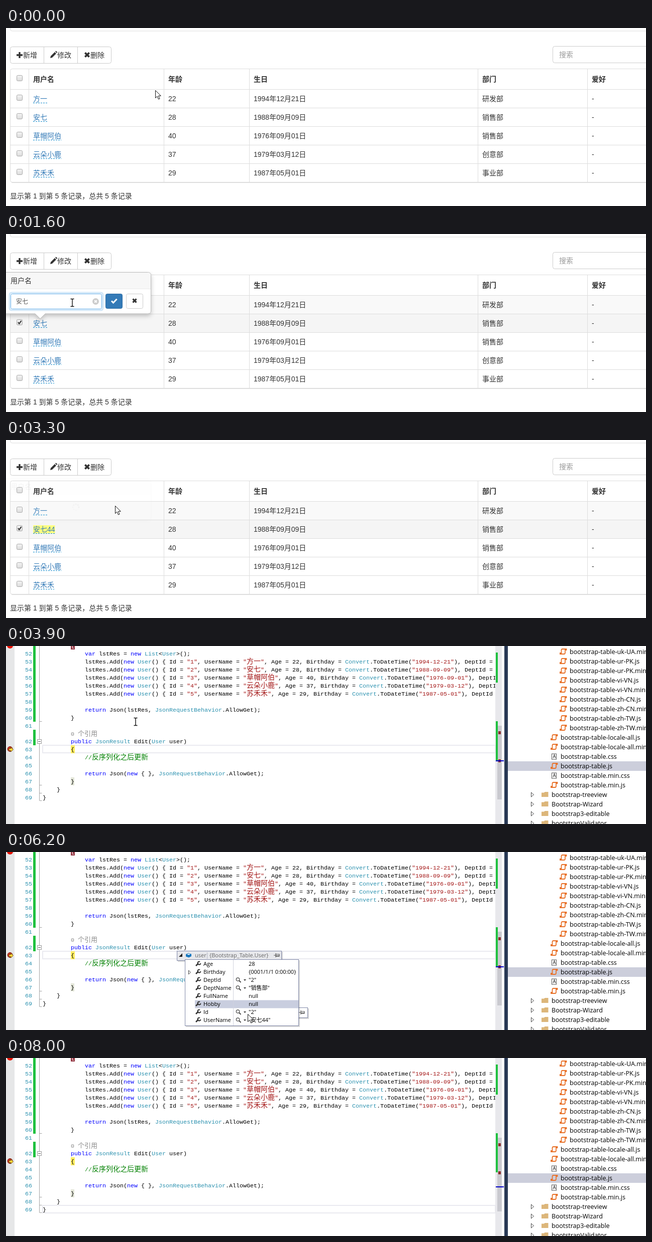
An HTML page for the animation above (8.1 s loop, 1274 by 355 pixels).

```html
<!DOCTYPE html>
<html lang="zh-CN">
<head>
<meta charset="utf-8">
<title>Inline table editing</title>
<style>
html, body { margin: 0; width: 100%; height: 100%; overflow: hidden; background: #fff; }
svg { display: block; width: 100vw; height: 100vh; }
text { white-space: pre; }
.page { font: 14px "Liberation Sans", "Noto Sans CJK SC", "Noto Sans CJK JP", sans-serif; }
.code { font: 11.667px "Liberation Mono", "Noto Sans CJK SC", "Noto Sans CJK JP", monospace; }
.tip { font: 11px "Open Sans", "Noto Sans", "Noto Sans CJK SC", "Noto Sans CJK JP", sans-serif; }
.tree { font: 12.55px "Open Sans", "Noto Sans", sans-serif; }
</style>
</head>
<body>
<svg id="stage" viewBox="0 0 1274 355" preserveAspectRatio="none">
  <defs>
    <linearGradient id="box" x2="0" y2="1"><stop stop-color="#f4f4f4"/><stop offset="1" stop-color="#dcdcdc"/></linearGradient>
    <filter id="shadow" x="-20%" y="-20%" width="140%" height="160%"><feDropShadow dx="0" dy="4" stdDeviation="4" flood-opacity=".22"/></filter>
    <clipPath id="editor"><rect width="974" height="355"/></clipPath>
  </defs>
  <g id="table" class="page"></g>
  <g id="ide"></g>
  <g id="live"></g>
</svg>
<script>
const LOOP = 8100, IDE_START = 3400;
const people = [
  ['方一', 22, '1994-12-21', '研发部'],
  ['安七', 28, '1988-09-09', '销售部'],
  ['草帽阿伯', 40, '1976-09-01', '销售部'],
  ['云朵小鹿', 37, '1979-03-12', '创意部'],
  ['苏禾禾', 29, '1987-05-01', '事业部']
];
const edited = people[1][0];
const $ = id => document.getElementById(id);
const esc = s => String(s).replace(/&/g, '&amp;').replace(/</g, '&lt;');
const text = (x, y, s, fill = '#333', more = '') => `<text x="${x}" y="${y}" fill="${fill}" ${more}>${esc(s)}</text>`;
const rect = (x, y, w, h, fill, more = '') => `<rect x="${x}" y="${y}" width="${w}" height="${h}" fill="${fill}" ${more}/>`;
const path = (d, fill, more = '') => `<path d="${d}" fill="${fill}" ${more}/>`;
const line = (d, color, w = 1, more = '') => path(d, 'none', `stroke="${color}" stroke-width="${w}" ${more}`);
const move = (x, y, s) => `<g transform="translate(${x} ${y})">${s}</g>`;
const framed = (x, y, w, h, fill, stroke, r = 0) => rect(x + .5, y + .5, w, h, fill, `stroke="${stroke}" rx="${r}"`);
const times = (x, y, r, color, w) => line(`M${x - r} ${y - r}l${2 * r} ${2 * r}m0 ${-2 * r}l${-2 * r} ${2 * r}`, color, w);

// ---- table page ----
const rowY = i => 123 + 37 * i;

function checkbox(y, on) {
  return framed(21, y, 11, 11, 'url(#box)', '#a8a8a8', 2) +
    (on ? line(`M24 ${y + 6}l2.3 2.8l4.3 -6`, '#333', 2) : '');
}

function nameCell(i, name, marked) {
  const y = rowY(i), w = [...name].reduce((s, c) => s + (c < '\u0100' ? 7.8 : 14), 0);
  return (marked ? rect(54, y + 10, w, 16, '#ffff80') : '') +
    text(54, y + 23, name, '#337ab7') +
    line(`M54 ${y + 26.5}h${w}`, '#0088cc', 1, 'stroke-dasharray="3 2"');
}

function tablePage() {
  let s = rect(0, 0, 1274, 355, '#fff') +
    line('M8.5 0v2q0 4 4 4h1270', '#ddd') +
    framed(8, 37, 201, 33, '#fff', '#ccc', 4) + line('M75.5 37v34M142.5 37v34', '#ccc') +
    line('M21 54h12M27 48v12', '#333', 3.4) + text(34, 59, '新增') +
    path('M88 60l1-4l8-8l3 3l-8 8zM98 47l1.5-1.5l3 3l-1.5 1.5z', '#333') + text(102, 59, '修改') +
    times(161.5, 53.5, 4.2, '#333', 3.8) + text(168, 59, '删除') +
    framed(1088, 36, 220, 33, '#fff', '#ccc', 4) + text(1101, 58, '搜索', '#999');
  s += '<g id="rows"></g>' + framed(8, 81, 1300, 226, 'none', '#ddd', 4) + line('M11 308.5H1274', '#ddd');
  for (let i = 0; i < 5; i++) s += line(`M8 ${rowY(i) - .5}H1274`, '#ddd');
  s += line([45, 314, 484, 939, 1157].map(x => `M${x}.5 82V307`).join(''), '#ddd') + checkbox(94);
  [[54, '用户名'], [323, '年龄'], [493, '生日'], [948, '部门'], [1166, '爱好']]
    .forEach(([x, t]) => s += text(x, 107, t, '#333', 'font-weight="bold"'));
  people.forEach(([, age, date, dept], i) => {
    const y = rowY(i) + 23, [a, b, c] = date.split('-');
    s += text(323, y, age) + text(493, y, `${a}年${b}月${c}日`) + text(948, y, dept) + text(1166, y, '-');
  });
  return s + '<g id="names"></g>' + text(8, 340, '显示第 1 到第 5 条记录，总共 5 条记录');
}

function popover(t) {
  const alpha = t < 1000 ? .5 : t < 3200 ? 1 : t < 3300 ? .4 : .05;
  const saving = t >= 2900;
  const value = edited + '4'.repeat(t < 2000 ? 0 : t < 2200 ? 1 : 2);
  let s = '<g filter="url(#shadow)">' +
    path('M-10 76.5H282.5q6 0 6 6V153q0 6 -6 6H78l-10 10l-10 -10H-10z', '#fff', 'stroke="#bbb"') + '</g>' +
    path('M-10 77H282q6 0 6 6V109H-10z', '#f7f7f7') + line('M0 109.5H288', '#ebebeb') +
    text(9, 98, '用户名');
  if (saving) {
    for (let i = 0; i < 8; i++) {
      const a = (i + t / 100) * Math.PI / 4;
      s += `<circle cx="${139 + 6 * Math.cos(a)}" cy="${134 + 6 * Math.sin(a)}" r="1.6" fill="#555" opacity="${(i + 1) / 8}"/>`;
    }
  } else {
    s += rect(7, 117, 186, 35, 'none', 'stroke="#66afe9" stroke-opacity=".3" stroke-width="3" rx="4"') +
      framed(9, 119, 181, 30, '#fff', '#66afe9', 3) + text(20, 139, value, '#555', 'font-size="12"') +
      '<circle cx="178.5" cy="134.5" r="6.5" fill="#ccc"/>' + times(178.5, 134.5, 2.3, '#fff', 2) +
      framed(198, 119, 33, 29, '#337ab7', '#2e6da4', 3) + line('M210 133.5l3.6 3.6l7 -7.4', '#fff', 3) +
      framed(239, 119, 33, 29, '#fff', '#ccc', 3) + times(256, 133, 3.5, '#333', 3.2);
    if (t >= 1800) s += rect(45 + 6.7 * (value.length - 2), 127, 1, 14, '#333');
  }
  return `<g class="page" opacity="${alpha}">${s}</g>`;
}

// ---- code editor ----
const keywords = /^(var|new|return|public)$/, types = /^(List|User|Convert|JsonRequestBehavior|JsonResult)$/;

function codeLine(col, y, src) {
  let x = 73 + 7 * col, s = '';
  for (const [tok] of src.matchAll(/\/\/.*|"[^"]*"|\w+|\s+|[^\w\s"]/g)) {
    const fill = tok.startsWith('//') ? '#008000' : tok[0] === '"' ? '#a31515' :
      keywords.test(tok) ? '#0000ff' : types.test(tok) ? '#2b91af' : '#000';
    for (const [run] of tok.matchAll(/[\u4e00-\u9fff]+|[^\u4e00-\u9fff]+/g)) {
      const wide = run >= '\u4e00';
      if (run.trim()) s += text(x, y, run, fill, wide ? 'font-size="14"' : '');
      x += run.length * (wide ? 14 : 7);
    }
  }
  return s;
}

function treeIcon(x, y, kind) {
  if (kind === 'css') return framed(x - 5, y - 6, 9, 11, '#fff', '#555') +
    line(`M${x - 2} ${y + 3}l2.5 -7l2.5 7m-4 -2.5h3`, '#555', 1.2);
  if (kind === 'dir') return path(`M${x - 7} ${y - 4}h5l1.5 -1.5h7v10h-13.5z`, '#dcb67a');
  return line(`M${x - 6} ${y + 2.5}v2h8q2 0 2 -3v-5h2.5v-2h-8q-2 0 -2 3v5z`, '#e8722a', 1.8);
}

function tree() {
  const deep = ['uk-UA.min.js', 'ur-PK.js', 'ur-PK.min.js', 'vi-VN.js', 'vi-VN.min.js',
    'zh-CN.js', 'zh-CN.min.js', 'zh-TW.js', 'zh-TW.min.js'].map(n => [1122, 'bootstrap-table-' + n]);
  const files = ['-locale-all.js', '-locale-all.min.js', '.css', '.js', '.min.css', '.min.js']
    .map(n => [1104, 'bootstrap-table' + n]);
  const dirs = ['bootstrap-treeview', 'Bootstrap-Wizard', 'bootstrap3-editable', 'bootstrapValidator']
    .map(n => [1086, n, 'dir']);
  let s = rect(999, 0, 275, 355, '#fff') + rect(999, 230, 275, 19, '#cccedb');
  [...deep, ...files, ...dirs].forEach(([x, name, dir], i) => {
    const y = 11.5 + 19 * i;
    s += treeIcon(x - 13, y, dir || (name.endsWith('.css') ? 'css' : 'js')) + text(x, y + 4.5, name, '#000');
    if (dir) s += path(`M1045.5 ${y - 4.5}l5 4.5l-5 4.5z`, '#fff', 'stroke="#444"');
  });
  return `<g class="tree">${s}</g>`;
}

function idePage() {
  let s = rect(0, 0, 1274, 355, '#fff') + rect(0, 0, 17, 355, '#e6e7e8') +
    '<circle cx="8" cy="-1" r="6" fill="#e51400"/>' +
    '<circle cx="8" cy="205.5" r="5" fill="#c8321e" stroke="#7a2418"/>' +
    path('M6 204.5h3.5v-2.5l5 4.5l-5 4.5v-2.5h-3.5z', '#ffd83b', 'stroke="#5a4310" stroke-width=".8"') +
    rect(54, 0, 5, 151, '#1fc13f') + rect(54, 167, 5, 31, '#1fc13f') +
    line('M66.5 0V308M66.5 150.5h5M66.5 277.5h5M66.5 293.5h5M66.5 308.5h5', '#a5a5a5') +
    framed(62, 186, 8, 8, '#fff', '#999') + line('M64 190.5h5', '#555') +
    '<g id="current"></g>' +
    rect(129, 0, 8, 7, '#963a46') + rect(129, 198, 8, 16, '#ffee62') + rect(129, 262, 7, 16, '#e3e6d8');
  const adds = people.map(([n, age, date], i) =>
    `lstRes.Add(new User() { Id = "${i + 1}", UserName = "${n}", Age = ${age}, Birthday = Convert.ToDateTime("${date}"), DeptId = "1" });`);
  const source = [[12, 'var lstRes = new List<User>();'], ...adds.map(a => [12, a]), [0, ''],
    [12, 'return Json(lstRes, JsonRequestBehavior.AllowGet);'], [8, '}'], [0, ''],
    [8, 'public JsonResult Edit(User user)'], [8, '{'], [12, '//反序列化之后更新'], [0, ''],
    [12, 'return Json(new { }, JsonRequestBehavior.AllowGet);'], [8, '}'], [4, '}'], [0, '}']];
  let c = text(129, 3, '{', '#fff');
  source.forEach(([col, src], i) => {
    const y = 19 + 16 * i + (i > 9 ? 15 : 0);
    c += text(52, y, 52 + i, '#2b91af', 'text-anchor="end"') + codeLine(col, y, src);
  });
  c += text(129, 179, '0', '#8a8a8a') + text(143, 179, '个引用', '#8a8a8a', 'font-size="13"');
  s += `<g class="code" clip-path="url(#editor)">${c}</g>`;
  s += rect(974, 0, 13, 355, '#e8e8ec') + rect(978, 159, 9, 147, '#c9c9cf') +
    rect(975, 13, 4, 60, '#1fc13f') + rect(975, 150, 4, 78, '#1fc13f') +
    rect(980, 170, 5, 6, '#8b2e2e') + rect(980, 226, 5, 6, '#8b2e2e') +
    '<g id="mark"></g>' + rect(992, 0, 7, 355, '#293955');
  return s + tree();
}

const pin = (x, y) => line(`M${x - 6} ${y}h4m0 -4v8m0 -6h7v4h-7m0 -1h7`, '#555', 1.2);
const panel = (x, y, w, h, fill = '#fff') =>
  rect(x + 2, y + 2, w + 1, h + 1, '#000', 'opacity=".15"') + framed(x, y, w, h, fill, '#8088a8');
const fields = [['Age', '28'], ['Birthday', '{0001/1/1 0:00:00}'], ['DeptId', '"2"', 1], ['DeptName', '"销售部"', 1],
  ['FullName', 'null'], ['Hobby', 'null'], ['Id', '"2"', 1], ['UserName', `"${edited}44"`, 1]];

function dataTip(t) {
  const open = t >= 5400, busy = t >= 5000 && !open;
  let s = panel(340, 197, 208, 19, '#e7e8ec') +
    (open ? path('M351 202v7h-7z', '#1e1e1e') : path('M346 202l4.5 4.5l-4.5 4.5z', '#1e1e1e')) +
    (busy ? '<circle cx="361.5" cy="205" r="5.5" fill="#bfe6fb" stroke="#1976c8" stroke-width="3.4"/>'
          : path('M358 204l5 -2.5l6 2v4.5l-5 2.5l-6 -2z', '#1878c0') + path('M360 204l3.5 -1.5l3.5 1.2l-3 1.5z', '#fff')) +
    text(376, 210, 'user', '#666') + line('M400.5 200v13', '#b5b7c4') +
    text(405, 210, '{Bootstrap_Table.User}', '#666') + pin(539, 206);
  if (open) {
    const hot = t < 5800 ? -1 : Math.min(7, Math.floor((cursorAt(Math.min(t, 7000) - 100)[1] - 215) / 16));
    const pinY = Math.min(224 + 16 * (hot + 1), 320);
    if (hot >= 0) s += panel(580, hot < 7 ? pinY - 10 : 327, 20, hot < 7 ? 20 : 19) + pin(589, pinY);
    s += panel(356, 214, 226, 132);
    if (hot >= 0) s += rect(376, 215.5 + 16 * hot, 206, 16, '#c9cedf');
    s += line('M452.5 215v131', '#d0d3de');
    fields.forEach(([name, value, lens], i) => {
      const y = 223 + 16 * i;
      s += line(`M378 ${y + 4}l5 -5`, '#333', 2.6) + line(`M386 ${y - 4}a3 3 0 1 0 1.5 3`, '#333', 2) +
        text(393, y + 4, name, '#000') + text(483, y + 4, value, '#000');
      if (lens) s += `<circle cx="461.5" cy="${y - 1}" r="3.2" fill="none" stroke="#444" stroke-width="1.2"/>` +
        line(`M464 ${y + 1.5}l3.5 3.5`, '#444', 1.8) + path(`M473 ${y - 1}h5l-2.5 3z`, '#333');
    });
    s += path('M363.5 236l4 4l-4 4z', '#fff', 'stroke="#444"');
  }
  return `<g class="tip">${s}</g>`;
}

// ---- pointer ----
const track = [[0, 297, 124], [400, 139, 187], [700, 68, 176], [900, 68, 176], [1200, 262, 196], [1600, 132, 137],
  [2400, 132, 137], [2800, 217, 131], [3700, 217, 131], [4300, 341, 190],
  [4600, 341, 190], [4800, 347, 203], [5700, 347, 203], [6100, 455, 302], [6200, 481, 323], [6600, 520, 337],
  [6700, 516, 337], [6800, 516, 337], [6900, 513, 337], [7000, 513, 337], [7100, 640, 310], [7300, 640, 310],
  [7700, 1243, 210], [8100, 1243, 210]];
const looks = [[0, 'arrow'], [600, 'hand'], [1400, 'beam'], [1800, ''], [2500, 'beam'], [2700, 'arrow'],
  [3400, 'beam'], [4700, 'arrow'], [7800, '']];
const pointers = {
  arrow: path('M.5 .5V15.5L4 12.2L6.5 18L9 17L6.5 11.3H11.3z', '#fff', 'stroke="#111"'),
  beam: line('M-3.5 -7.5h2.5l1 1l1 -1h2.5M0 -6.5V6.5M-3.5 7.5h2.5l1 -1l1 1h2.5', '#111', 1.4),
  hand: path('M-1 1q1.5 -2 3 0v6l8 2q2 1 1.5 4l-1.5 4h-8l-5 -6q0 -2 2 -1.5z', '#fff', 'stroke="#111"')
};

function cursorAt(t) {
  const i = track.findIndex(k => k[0] > t), a = track[i - 1], b = track[i];
  const p = (t - a[0]) / (b[0] - a[0]);
  return [a[1] + (b[1] - a[1]) * p, a[2] + (b[2] - a[2]) * p].map(Math.round);
}

function pointer(t) {
  const look = looks.filter(k => k[0] <= t).pop()[1];
  return look ? move(...cursorAt(t), pointers[look]) : '';
}

// ---- timeline ----
function draw(t) {
  const ide = t >= IDE_START;
  $('table').style.display = ide ? 'none' : '';
  $('ide').style.display = ide ? '' : 'none';
  let s = '';
  if (ide) {
    const last = t >= 7300, y = last ? 294 : 198;
    $('current').innerHTML = t < 3500 ? '' : rect(73, y, 901, 15, '#fff', 'stroke="#eaeaf0" stroke-width="2"');
    $('mark').innerHTML = rect(975, last ? 256 : 228, 16, 2, '#0000c8');
    if (t >= 4400 && !last) s += dataTip(t);
    if (last && t < 8000) s += rect(80, 294, 1, 15, '#000');
  } else {
    const picked = t >= 700, saved = t >= 3200;
    $('rows').innerHTML = picked ? rect(9, 123, 1265, 36, '#f9f9f9') + rect(9, 160, 1265, 36, '#f5f5f5') : '';
    $('names').innerHTML = people.map(([n], i) => checkbox(rowY(i) + 10, i === 1 && picked) +
      nameCell(i, i === 1 && saved ? n + '44' : n, i === 1 && saved)).join('');
    if (t >= 900) s += popover(t);
  }
  $('live').innerHTML = s + pointer(t);
}

$('table').innerHTML = tablePage();
$('ide').innerHTML = idePage();
const start = performance.now();
let shown = -1;
function tick() {
  const t = Math.floor((performance.now() - start) % LOOP / 100) * 100;
  if (t !== shown) draw(shown = t);
  requestAnimationFrame(tick);
}
tick();
</script>
</body>
</html>
```
